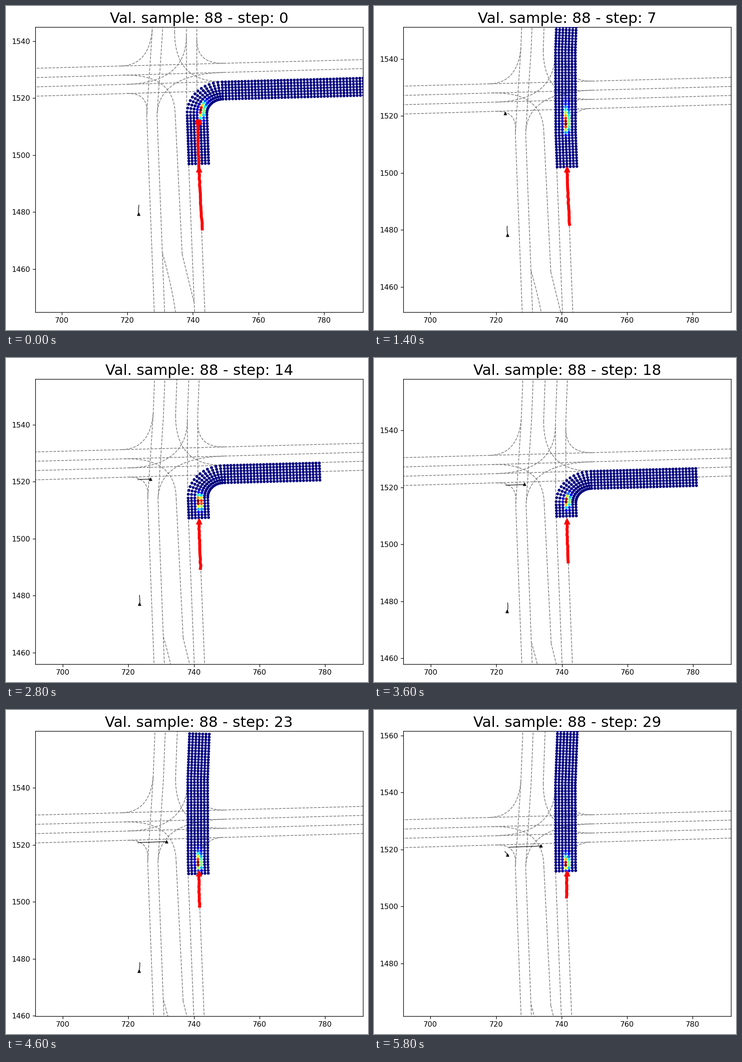
Animation of 791x708 px, one loop 6 s. Source, as a matplotlib script:

```python
import numpy as np
import matplotlib.pyplot as plt
from matplotlib.animation import FuncAnimation

W, H, DPI = 791, 708, 115.5
STEPS, PAST = 30, 19

# North-south lanes: x at four heights, in pairs one lane width apart
GAP = 3.15
YS = np.array([1445, 1514, 1543, 1562])
WEST = np.array([728.2, 725.9, 727.55, 728.2])
MID = np.array([737.6, 734.6, 734.4, 735])
EAST = np.array([740.5, 738.1, 738.02, 738.65])

# Corners: east-west lane, x where the turn begins, north-south lane, y where it ends
TURNS = [(3, 720, WEST, 1514), (0, 718, WEST, 1544), (1, 718.7, MID, 1514),
         (2, 749.4, MID, 1543), (0, 749.4, EAST + GAP, 1540.5),
         (2, 720, EAST, 1542), (1, 749.4, WEST + GAP, 1514.5)]

# Vehicle progress and the most likely goal, as key steps
EGO_T = [-19, -9, 0, 7, 10, 14, 18, 23, 29]
EGO_Y = [1474.05, 1485.3, 1494.9, 1501.15, 1503.35, 1506, 1508, 1509.9, 1511.55]
PEAK_T = [0, 7, 10, 14, 18, 23, 29]
PEAK_Y = [1516.1, 1517.3, 1516.4, 1513, 1515.3, 1513.4, 1514.7]

# Right turn: a fillet of radius R that begins at P0
P0, R, TILT = np.array([741.25, 1514.4]), 8.0, .031
RIGHT = np.array([np.cos(TILT), np.sin(TILT)])
UP = np.array([-np.sin(TILT), np.cos(TILT)])
ACROSS = np.arange(-3, 4)
NODE = 2.585


def ew(k, x):
    return 1530.4 - 3.265 * k + (.0305 + .001 * k) * (x - 690)


def ns(lane, y):
    return np.interp(y, YS, lane)


def bezier(a, b, c):
    t = np.linspace(0, 1, 14)[:, None]
    a, b, c = map(np.array, (a, b, c))
    return (1 - t) ** 2 * a + 2 * t * (1 - t) * b + t ** 2 * c


def corner(k, x, lane, y):
    xc = ns(lane, 1527)
    return bezier((x, ew(k, x)), (xc, ew(k, xc)), (ns(lane, y), y))


def road(s, turn):
    """Centre points and right-hand normals at distance s."""
    if turn:
        u = s - P0[1]
        a = np.clip(u / R, 0, np.pi / 2)
        up = np.minimum(u, 0) + R * np.sin(a)
        right = R * (1 - np.cos(a)) + np.maximum(u - R * np.pi / 2, 0)
        pos = P0 + np.outer(up, UP) + np.outer(right, RIGHT)
        return pos, np.outer(np.cos(a), RIGHT) - np.outer(np.sin(a), UP)
    x = ns(EAST + GAP, s)
    return np.c_[x, s], np.c_[np.ones_like(s), -np.gradient(x, s)]


def heat_grid(step, y):
    first = 1497 + NODE * np.ceil((y - 1497) / NODE)
    s = first + np.arange(80 if step < 12 else 50)
    turn = step < 6 or 9 <= step <= 20
    pos, normal = road(s, turn)
    pts = pos[:, None] + ACROSS[None, :, None] * normal[:, None]

    # Blob on the road: tighter as the car slows, longer ahead when going straight
    ds = s - np.interp(step, PEAK_T, PEAK_Y)
    dd = ACROSS - (max(.3, 1.3 - .06 * step) if turn else .3)
    spread = 2.2 - .035 * step
    spread = np.where(ds > 0, spread * (1 if turn else 1.8), spread)
    v = np.outer(np.exp(-(ds / spread) ** 2 / 2), np.exp(-(dd / .55) ** 2 / 2))
    return pts.reshape(-1, 2), (v / v.max()).ravel()


def ego(t):
    return 741.56 + .00096 * (t - 18) ** 2, np.interp(t, EGO_T, EGO_Y)


def walker(t):
    x = 723.44 + .07 * np.sin(t * .22) + .05 * np.sin(t * 1.3)
    return x, 1479.3 - .163 * t


def crosser(t):
    x = np.interp(t, [7, 10, 14, 18, 23, 29],
                  [722.9, 724.1, 726.75, 728.62, 731.7, 733.76])
    return x, 1520.75 + .024 * (t - 7)


def latecomer(t):
    u = (t - 24) / 5
    return 722.7 + .8 * u, 1519.3 - 1.25 * u + .15 * np.sin(np.pi * u)


# Other agents: motion, first and last step seen
OTHERS = [(walker, -PAST, 25), (crosser, 7, 29), (latecomer, 24, 29)]

wobble = np.random.default_rng(4).normal(0, .05, STEPS + PAST)

fig = plt.figure(figsize=((W + 1e-6) / DPI, (H + 1e-6) / DPI), dpi=DPI)
ax = fig.add_axes([63.8 / W, 39.2 / H, 716.1 / W, 622.6 / H])
ax.set_xticks(range(700, 800, 20))
ax.set_yticks(range(1440, 1580, 20))
title = ax.set_title("", fontsize=20)


def dashed(x, y):
    ax.plot(x, y, "--", color="gray", lw=1, zorder=1)


span = np.array([690, 794])
for k in range(4):
    dashed(span, ew(k, span))
for lane in (WEST, WEST + GAP, EAST, EAST + GAP):
    dashed(lane, YS)
for ys in ([1465.3, 1514], [1543, 1562]):
    dashed(ns(MID, ys), ys)
dashed([736.7, 740.4], [1465.3, 1448])
dashed(*bezier((730.7, 1465.6), (733.6, 1454), (734.65, 1445)).T)
dashed(*road(np.linspace(1514, 1527, 20), True)[0].T)
for turn in TURNS:
    dashed(*corner(*turn).T)

dots = ax.scatter([], [], s=16, c=[], cmap="jet", vmin=0, vmax=1, lw=0, zorder=3)
tracks = [(ax.plot([], [], "k", lw=1, alpha=.8, zorder=2)[0],
           ax.plot([], [], "k^", ms=4, alpha=.8, zorder=2)[0]) for _ in OTHERS]
trail, = ax.plot([], [], "r", lw=4, zorder=4)
head, = ax.plot([], [], "r^", ms=8, zorder=5)
goal, = ax.plot([], [], "ro", ms=8, zorder=5)


def draw(step):
    x, y = ego(step)
    ax.set_xlim(x - 50, x + 50)
    ax.set_ylim(y - 50, y + 50)
    title.set_text(f"Val. sample: 88 - step: {step}")

    pts, values = heat_grid(step, y)
    dots.set_offsets(pts)
    dots.set_array(values)

    # The first step also shows the true future path
    last = STEPS - 1 if step == 0 else step
    t = np.arange(step - PAST, last + 1)
    tx, ty = ego(t)
    trail.set_data(tx + wobble[t + PAST], ty)
    head.set_data([x], [y])
    goal.set_data(tx[-1:], ty[-1:])
    goal.set_visible(step == 0)

    for (move, begin, end), (line, mark) in zip(OTHERS, tracks):
        seen = begin <= step <= end
        line.set_visible(seen)
        mark.set_visible(seen)
        if seen:
            px, py = move(np.arange(max(begin, step - PAST), step + 1))
            line.set_data(px, py)
            mark.set_data(px[-1:], py[-1:])
    return []


anim = FuncAnimation(fig, draw, frames=STEPS, interval=200, repeat=True,
                     repeat_delay=0, blit=False)
plt.show()
```
